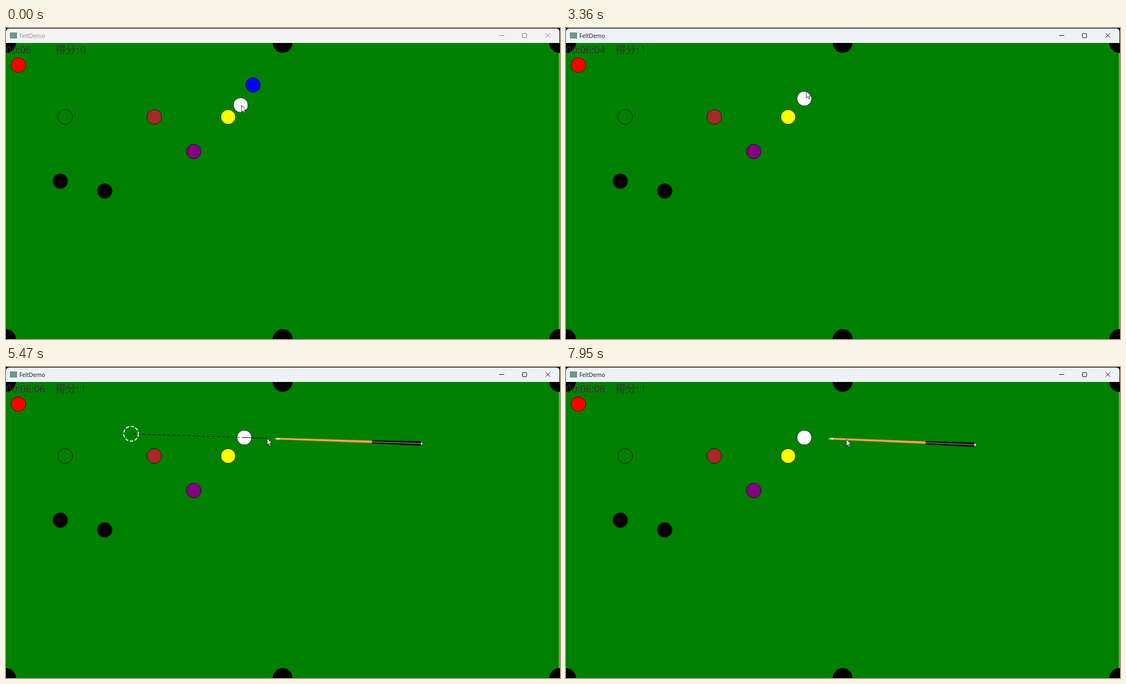
An HTML page that plays this animation: 998x561 px, repeating every 7990 ms.

```html
<!DOCTYPE html>
<html lang="zh">
<head>
<meta charset="utf-8">
<title>FeltDemo</title>
<style>
html, body { margin: 0; width: 100%; height: 100%; overflow: hidden; background: #000; }
svg { display: block; width: 100%; height: 100%; }
text { font-family: "Open Sans", "Noto Sans CJK SC", "Noto Sans CJK", sans-serif; }
.hud { font-size: 17.85px; fill: #333; }
.ball { stroke: #111; stroke-width: .9; }
.aim { stroke: #000; stroke-width: .95; }
</style>
</head>
<body>
<svg viewBox="0 0 998 561" xmlns="http://www.w3.org/2000/svg">
  <defs>
    <clipPath id="table"><rect y="27" width="998" height="534"/></clipPath>
    <linearGradient id="wood" x2="0" y2="1">
      <stop offset="0" stop-color="#a8642a"/>
      <stop offset=".4" stop-color="#f2b468"/>
      <stop offset=".65" stop-color="#e8a050"/>
      <stop offset="1" stop-color="#8c5420"/>
    </linearGradient>
    <linearGradient id="grip" x2="0" y2="1">
      <stop offset="0" stop-color="#000"/>
      <stop offset=".32" stop-color="#151515"/>
      <stop offset=".5" stop-color="#77727c"/>
      <stop offset=".68" stop-color="#1c1c1c"/>
      <stop offset="1" stop-color="#000"/>
    </linearGradient>
  </defs>

  <rect width="998" height="561" fill="#000"/>
  <path id="bar" d="M0 27V7Q0 1 6 1H991Q997 1 997 7V27Z"/>
  <rect x="7" y="8" width="13" height="11" fill="#6a9a90"/>
  <text id="title" x="24" y="17.6" font-size="10.3">FeltDemo</text>
  <g id="buttons" fill="none">
    <path d="M888.5 13.5H897.5M972 9.5L980 17.5M980 9.5L972 17.5"/>
    <rect x="930.2" y="10" width="7.6" height="7.4" rx=".8"/>
  </g>

  <g clip-path="url(#table)">
    <rect y="27" width="998" height="534" fill="#008000"/>
    <rect x="996.3" y="27" width="1" height="534" fill="#c4d8c4"/>
    <circle id="white" class="ball" r="13.3" fill="#fff"/>
    <g id="cue">
      <path d="M9 -1.7L175 -2.8V2.8L9 1.7Z" fill="url(#wood)"/>
      <path d="M0 -1.2L9 -1.7V1.7L0 1.2Z" fill="#d8f4ee"/>
      <path d="M0 -1.2H2.5V1.2H0Z" fill="#3cb4a0"/>
      <path d="M175 -2.9L263 -4V4L175 2.9Z" fill="url(#grip)"/>
      <path d="M263 -2.4L266 -.8V.8L263 2.4Z" fill="#eee"/>
    </g>
    <g id="guide" fill="none">
      <line id="pull" class="aim"/>
      <line id="path" class="aim" stroke-dasharray="4.45 4.45" stroke-linecap="square"/>
      <circle id="ghost" r="13.3" stroke="#fff" stroke-width="1.75" stroke-dasharray="4.45 4.45" stroke-linecap="square"/>
    </g>
    <g id="balls"></g>
    <g id="pockets"></g>
    <text id="clock" class="hud" x="0" y="45.6"></text>
    <text class="hud" x="89" y="45.6" style="font-size:18.5px;font-family:'Noto Sans CJK SC','Noto Sans CJK',sans-serif">得分:</text>
    <text id="score" class="hud" x="134" y="45.6"></text>
  </g>
  <path id="cursor" d="M0 0V12.2L2.8 9.6L4.7 14L6.7 13.1L4.8 8.8H8.6Z" fill="#fff" stroke="#000" stroke-width=".8"/>
</svg>
<script>
const LOOP = 7990, CUE_GAP = 14, REACH = 4.95;
const PRESS1 = 530, SHOT1 = 1910, HIT = 2235, BUMP = 2320, POT = 2790;
const PRESS2 = 3770, SHOT2 = 7780, SHOT2_MS = 281;
const TICKS = [240, 1230, 2220, 3230, 4230, 5230, 6240, 7260];

// time, x, y, and 1 where the move into the point is eased
const MOUSE = [
  [530, 424.4, 139.5], [1090, 359, 241, 1], [1420, 360, 246.8], [2760, 360, 246.8],
  [3360, 433, 114, 1], [3490, 423, 121], [3570, 421, 123], [3770, 421, 123],
  [4100, 428, 121.6], [4350, 436, 122], [4540, 439, 123.6], [4620, 438.7, 124.4],
  [4770, 438.7, 124.4], [4820, 443, 122], [4860, 443.6, 126.3], [5550, 474, 129],
  [5750, 492, 132.8], [5960, 504.5, 131], [6360, 508.3, 131.6], [6490, 508.3, 131],
  [7240, 508.3, 131], [7460, 505, 130.5]
];

const $ = id => document.getElementById(id);
const el = Object.fromEntries([...document.querySelectorAll("[id]")].map(e => [e.id, e]));
const set = (e, attrs) => { for (const k in attrs) e.setAttribute(k, attrs[k]); };
const show = (e, on) => set(e, { visibility: on ? "visible" : "hidden" });
const move = (e, x, y, more = "") => set(e, { transform: `translate(${x} ${y})${more}` });
const clamp = v => Math.max(0, Math.min(1, v));
const mix = (a, b, p) => a + (b - a) * p;
const part = (t, from, to) => clamp((t - from) / (to - from));

function circle(parent, x, y, r, fill, cls) {
  const c = document.createElementNS("http://www.w3.org/2000/svg", "circle");
  set(c, { cx: x, cy: y, r, fill });
  if (cls) set(c, { class: cls });
  parent.append(c);
  return c;
}

for (const [x, y, color] of [
  [22.2, 67, "#f00"], [106.7, 160.5, "#008000"], [267, 160.5, "#a52a2a"],
  [400.2, 160.5, "#ff0"], [338.1, 222.8, "#800080"], [97.8, 276.3, "#000"], [177.9, 294, "#000"]
]) circle(el.balls, x, y, 13.3, color, "ball");
const blue = circle(el.balls, 445, 102.7, 13.3, "#00f", "ball");
for (const x of [0, 498.3, 996.6])
  for (const y of [27, 561]) circle(el.pockets, x, y, 17.8, "#000");

function mouseAt(t) {
  const i = MOUSE.findIndex(k => k[0] > t);
  if (i === 0) return MOUSE[0].slice(1, 3);
  if (i < 0) return MOUSE[MOUSE.length - 1].slice(1, 3);
  const a = MOUSE[i - 1], b = MOUSE[i];
  let p = part(t, a[0], b[0]);
  if (b[3]) p = p * p * (3 - 2 * p);
  return [mix(a[1], b[1], p), mix(a[2], b[2], p)];
}

function drawWindow(active) {
  set(el.bar, { fill: active ? "#eff1f9" : "#f3f3f3" });
  set(el.title, { fill: active ? "#111" : "#8c8c8c" });
  set(el.buttons, { stroke: active ? "#111" : "#777", "stroke-width": active ? 1 : .9 });
}

function drawCue(t, wx, wy, mx, my) {
  const first = t < PRESS2;
  const aiming = t >= PRESS1 && t < SHOT1 || t >= PRESS2 && t < SHOT2;
  const striking = t >= SHOT1 && t < HIT || t >= SHOT2;
  show(el.cue, aiming || striking);
  show(el.guide, aiming);
  const dx = mx - wx, dy = my - wy, d = Math.hypot(dx, dy), a = Math.atan2(dy, dx);
  const p = !striking ? 0 : first ? part(t, SHOT1, HIT) : part(t, SHOT2, SHOT2 + SHOT2_MS);
  const gap = CUE_GAP + d * (1 - p);
  move(el.cue, wx + gap * Math.cos(a), wy + gap * Math.sin(a), ` rotate(${a * 180 / Math.PI})`);
  const gx = wx - dx * REACH, gy = wy - dy * REACH;
  set(el.pull, { x1: wx, y1: wy, x2: mx, y2: my });
  set(el.path, { x1: wx, y1: wy, x2: gx, y2: gy });
  set(el.ghost, { cx: gx, cy: gy });
}

function draw(t) {
  const roll = part(t, HIT, BUMP);
  const wx = mix(422.8, 429.3, roll), wy = mix(139, 127.3, roll);
  const run = part(t, BUMP, POT), slide = run * (1.3 - .3 * run);
  const [mx, my] = mouseAt(t);
  const secs = TICKS.filter(k => t >= k).length;

  drawWindow(t >= PRESS1);
  set(el.white, { cx: wx, cy: wy });
  set(blue, { cx: mix(445, 481, slide), cy: mix(102.7, 46, slide) });
  show(blue, t < POT);
  drawCue(t, wx, wy, mx, my);
  move(el.cursor, mx, my);
  el.clock.textContent = "00:06" + (secs ? ":0" + secs : "");
  el.score.textContent = t < POT ? 0 : 1;
}

const start = performance.now();
function frame() {
  draw((performance.now() - start) % LOOP);
  requestAnimationFrame(frame);
}
draw(0);
requestAnimationFrame(frame);
</script>
</body>
</html>
```
